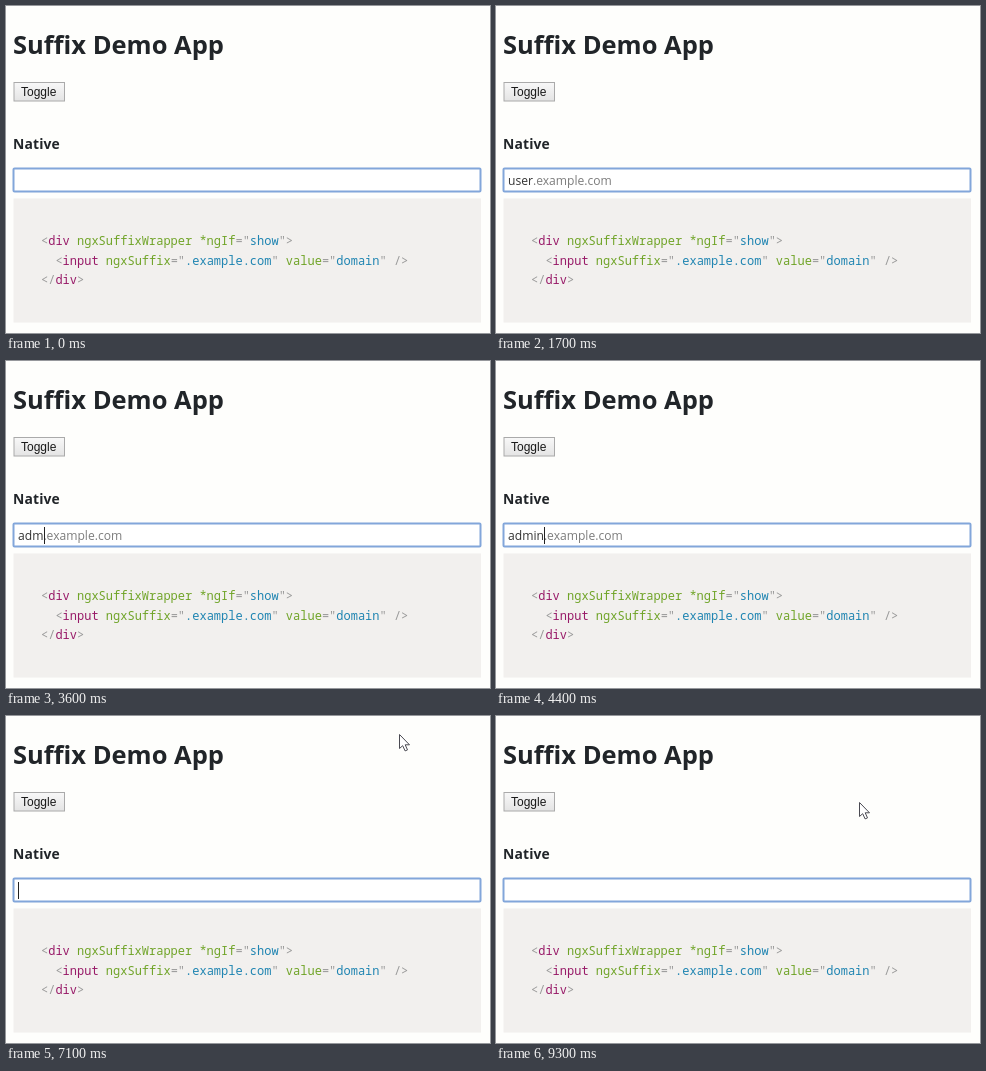
These frames come from a looping animation (484x327 px, 9.4 s). An HTML page:

```html
<!DOCTYPE html>
<html lang="en">
<head>
<meta charset="utf-8">
<title>Suffix Demo App</title>
<style>
  html, body { margin: 0; width: 100%; height: 100%; overflow: hidden; background: #fefefc; }
  svg { display: block; }
  text { white-space: pre; }
  .ui { font-family: "Open Sans", "Noto Sans", sans-serif; fill: #212529; }
  .bold { font-weight: 700; }
  .button { font: 12px "Liberation Sans", Arial, sans-serif; fill: #1a1a1a; }
  .field { font-size: 12.1px; fill: #333; }
  #suffix { fill: #7c7c7c; }
  .code { font: 12px "Noto Sans Mono", "DejaVu Sans Mono", monospace; fill: #999; }
  .tag { fill: #981a68; }
  .attr { fill: #70a428; }
  .value { fill: #2085b2; }
</style>
</head>
<body>
<svg width="484" height="327" viewBox="0 0 484 327">
  <defs>
    <linearGradient id="face" x2="0" y2="1">
      <stop stop-color="#f8f8f8"/>
      <stop offset="1" stop-color="#e4e4e4"/>
    </linearGradient>
  </defs>
  <text class="ui bold" x="7" y="47.5" font-size="25.5">Suffix Demo App</text>

  <rect x="8" y="76.5" width="50.5" height="18.5" fill="url(#face)" stroke="#aaa"/>
  <text class="button" x="15" y="90">Toggle</text>

  <text class="ui bold" x="7" y="143" font-size="13.9" letter-spacing=".15">Native</text>

  <rect x="7.5" y="162.5" width="467" height="23" rx="1" fill="#fff" stroke="#82a6da" stroke-width="2"/>
  <text class="ui field" x="12" y="179"><tspan id="typed"></tspan><tspan id="suffix"></tspan></text>
  <rect id="caret" y="166" width="1" height="17" fill="#222"/>

  <rect x="7.5" y="192.5" width="467.5" height="124" fill="#f2f0ee"/>
  <g class="code">
    <text x="35" y="239">&lt;<tspan class="tag">div</tspan> <tspan class="attr">ngxSuffixWrapper</tspan> <tspan class="attr">*ngIf</tspan>="<tspan class="value">show</tspan>"&gt;</text>
    <text x="35" y="258.5">  &lt;<tspan class="tag">input</tspan> <tspan class="attr">ngxSuffix</tspan>="<tspan class="value">.example.com</tspan>" <tspan class="attr">value</tspan>="<tspan class="value">domain</tspan>" /&gt;</text>
    <text x="35" y="278">&lt;/<tspan class="tag">div</tspan>&gt;</text>
  </g>

  <path id="pointer" d="M0 0V14L3.2 11.2L5.6 16.4L8 15.4L5.7 10.3H10Z" fill="#fff" stroke="#4a4a52" stroke-linejoin="round"/>
</svg>
<script>
  const LOOP = 9400, STEP = 100;
  const byId = id => document.getElementById(id);
  const typed = byId("typed"), suffix = byId("suffix");
  const caret = byId("caret"), pointer = byId("pointer");

  // [ms, field content]
  const edits = [
    [0, ""], [600, "u"], [800, "us"], [900, "use"], [1100, "user"],
    [2000, "use"], [2100, "us"], [2200, "u"], [2900, ""],
    [3200, "a"], [3400, "ad"], [3600, "adm"], [3800, "admi"], [4000, "admin"],
    [4600, "admi"], [4700, "adm"], [4800, "ad"], [4900, "a"], [5000, ""]
  ];

  // Caret visible within these spans
  const caretOn = [
    [100, 1600], [2000, 2700], [2900, 4500], [4600, 5500],
    [6100, 6600], [7100, 7600], [8200, 8700]
  ];

  // [ms, x, y] of the pointer tip
  const path = [
    [6400, 420, -20], [7000, 393.5, 18.5], [8600, 393.5, 18.5], [9300, 363.5, 86.5]
  ];

  const latest = (rows, t) => rows.filter(row => row[0] <= t).pop();

  function pointerAt(t) {
    const from = latest(path, t);
    if (!from) return null;
    const to = path[path.indexOf(from) + 1] || from;
    const span = to[0] - from[0];
    const k = span ? (t - from[0]) / span : 0;
    const ease = k * k * (3 - 2 * k);
    return [1, 2].map(i => from[i] + (to[i] - from[i]) * ease);
  }

  const show = (el, on) => el.setAttribute("visibility", on ? "visible" : "hidden");

  function draw(t) {
    const content = latest(edits, t)[1];
    if (typed.textContent !== content) {
      typed.textContent = content;
      suffix.textContent = content && ".example.com";
    }
    const width = content ? typed.getComputedTextLength() : 0;
    caret.setAttribute("x", Math.ceil(12 + width));
    show(caret, caretOn.some(([on, off]) => t >= on && t < off));

    const tip = pointerAt(t);
    show(pointer, tip);
    if (tip) pointer.setAttribute("transform", `translate(${tip})`);
  }

  const start = performance.now();
  function tick() {
    const t = (performance.now() - start) % LOOP;
    draw(Math.floor(t / STEP) * STEP);
    requestAnimationFrame(tick);
  }
  tick();
</script>
</body>
</html>
```
